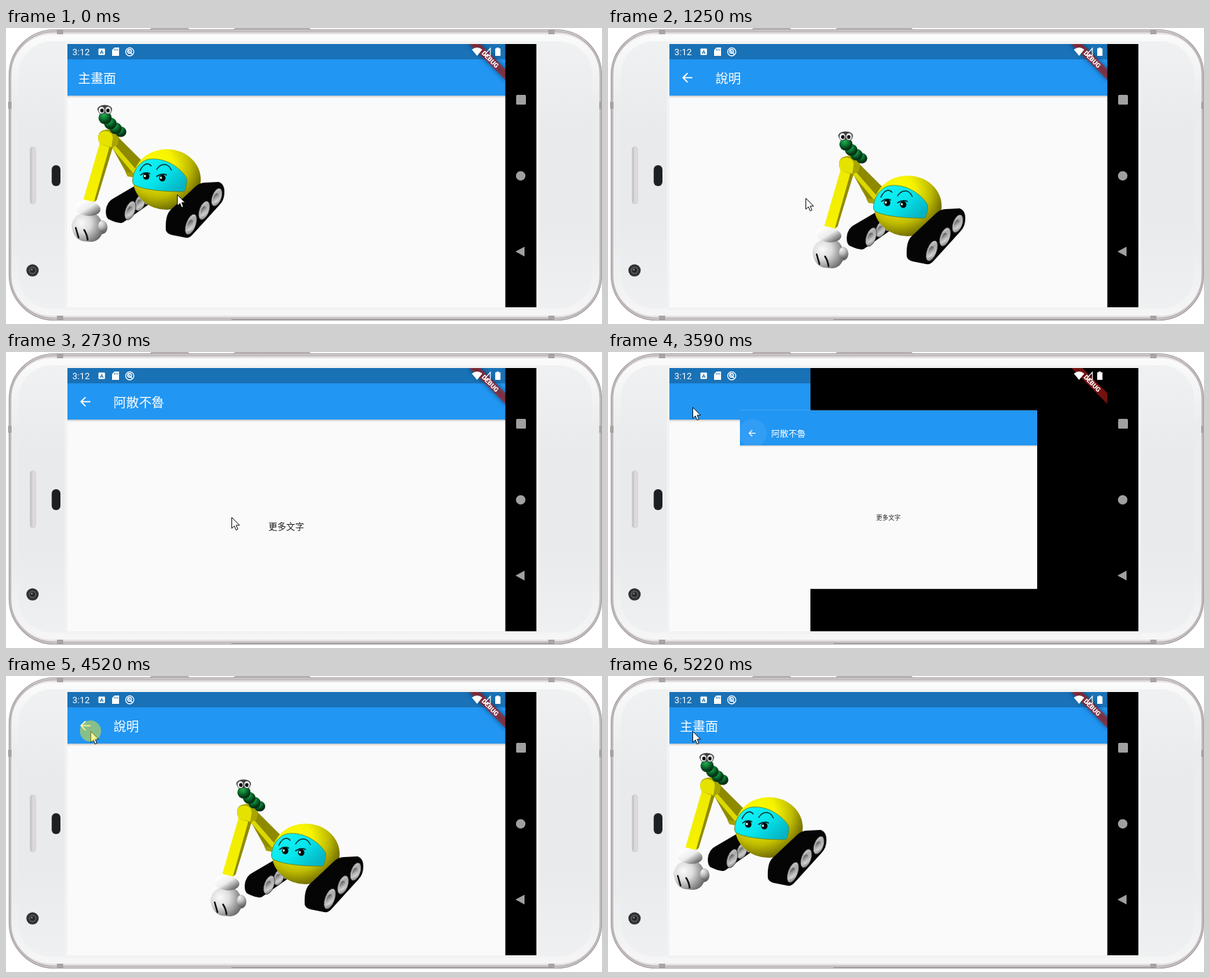
These frames come from a looping animation (854x425 px, 5530 ms). An HTML page with a canvas:

```html
<!DOCTYPE html>
<html lang="zh-Hant">
<head>
<meta charset="utf-8">
<title>Page transitions</title>
<style>
html, body { margin: 0; width: 100%; height: 100%; overflow: hidden; background: #fff; }
canvas { display: block; }
</style>
</head>
<body>
<canvas id="stage" width="854" height="425"></canvas>
<script>
const ctx = document.getElementById('stage').getContext('2d');
const LOOP = 5530, STEP = 77.9;
const APP = { x: 88, y: 23, w: 628, h: 378 };
const MID = { x: APP.x + APP.w / 2, y: APP.y + APP.h / 2 };
const BAR = 74;
const CJK = '"Noto Sans CJK TC", "Noto Sans CJK", sans-serif';
const HOME = [0, 0], CENTRE = [199, 38];

const clamp = v => Math.max(0, Math.min(1, v));
const progress = (k, start, length) => clamp((k - start) / length);

function rect(x, y, w, h, fill) {
  ctx.fillStyle = fill;
  ctx.fillRect(x, y, w, h);
}
function round(x, y, w, h, r, fill, line, width = 1) {
  ctx.beginPath();
  ctx.roundRect(x, y, w, h, r);
  paint(fill, line, width);
}
function oval(x, y, rx, ry, fill, turn = 0, line, width) {
  ctx.beginPath();
  ctx.ellipse(x, y, rx, ry, turn, 0, Math.PI * 2);
  paint(fill, line, width);
}
function paint(fill, line, width = 1) {
  if (fill) { ctx.fillStyle = fill; ctx.fill(); }
  if (line) { ctx.strokeStyle = line; ctx.lineWidth = width; ctx.stroke(); }
}
function shape(d, fill, line, width = 1) {
  const path = new Path2D(d);
  if (fill) { ctx.fillStyle = fill; ctx.fill(path); }
  if (line) { ctx.strokeStyle = line; ctx.lineWidth = width; ctx.stroke(path); }
}
function text(str, x, y, font, fill) {
  ctx.font = font;
  ctx.fillStyle = fill;
  ctx.fillText(str, x, y);
}
function stops(gradient, colors) {
  colors.forEach((c, i) => gradient.addColorStop(i / (colors.length - 1), c));
  return gradient;
}
const linear = (x0, y0, x1, y1, ...colors) => stops(ctx.createLinearGradient(x0, y0, x1, y1), colors);
const glow = (x, y, r, ...colors) => stops(ctx.createRadialGradient(x, y, 0, x, y, r), colors);

// cubic-bezier(.4, 0, .2, 1)
function ease(x) {
  if (x <= 0 || x >= 1) return clamp(x);
  let lo = 0, hi = 1;
  for (let i = 0; i < 24; i++) {
    const u = (lo + hi) / 2, v = 1 - u;
    if (1.2 * v * v * u + 0.6 * v * u * u + u * u * u < x) lo = u; else hi = u;
  }
  return 3 * (1 - lo) * lo * lo + lo * lo * lo;
}
// Circular arc that leaves its start horizontally
function arc(from, to, s) {
  const dx = to[0] - from[0], dy = to[1] - from[1];
  const dist = Math.hypot(dx, dy), r = dist * dist / Math.abs(dy) / 2;
  const a = 2 * Math.asin(dist / (2 * r)) * s;
  return [from[0] + Math.sign(dx) * r * Math.sin(a), from[1] + Math.sign(dy) * r * (1 - Math.cos(a))];
}

function drawPhone() {
  rect(0, 0, 854, 425, '#fff');
  round(207, 0.5, 55, 6, 2, '#d0cacc', '#a09a9b');
  round(327, 0.5, 109, 6, 2, '#d0cacc', '#a09a9b');
  round(4.5, 2.5, 849, 417, 65, '#d3cdcf', '#a19b9c', 1.2);
  round(6.5, 5.5, 845, 411, 62, '#e6e2e3', '#b5afb0', 1.6);
  for (const x of [73, 777]) for (const y of [3, 412]) rect(x, y, 9, 7, '#a8a3a4');
  for (const x of [3, 849]) rect(x, 106, 5, 10, '#a8a3a4');
  rect(323, 418, 460, 1.5, '#a09a9b');
  round(8, 9, 842, 404, 58, linear(0, 9, 0, 413, '#fbfbfb', '#ebecee', '#ebecee', '#ebecee', '#f6f6f7'));
  round(18, 19, 822, 384, 48, linear(0, 19, 0, 403, '#f0f1f2', '#e9eaec', '#e9eaec', '#eff0f1'));
  rect(84, 19, 680, 386, '#f1f2f3');
  round(34.5, 170.5, 8, 82, 4, linear(34, 0, 43, 0, '#bdb9bb', '#dad8d9', '#dedcdd'), '#d0cdce', 0.8);
  round(65.5, 197, 12.5, 30, 6, '#1d2023');
  oval(38, 348, 8.8, 8.8, '#2f3032');
  oval(38, 348, 5.5, 5.5, '#55565a');
  oval(38, 348, 3.6, 3.6, '#242528');
  oval(37, 347, 1.3, 1.3, '#85868b');
}

function drawNav() {
  rect(715.5, 23, 44.5, 378, '#000');
  round(731, 96, 14, 14, 1.5, '#a0a0a0');
  oval(737.5, 212.3, 6.8, 6.8, '#a0a0a0');
  shape('M730 321L743 314V328Z', '#a0a0a0');
}

function drawTrack(outline, wheels) {
  shape(outline, '#050505');
  for (const [x, y, rx, ry] of wheels) {
    oval(x, y, rx, ry, linear(x - rx, y - ry, x + rx, y + ry, '#e8e8e8', '#a8a8a8', '#c4c4c4', '#555'), 0.35, '#222', 0.8);
    oval(x - 1, y + 1, rx * 0.55, ry * 0.52, linear(x - 4, y - 5, x + 4, y + 6, '#444', '#aaa', '#eee'), 0.35);
  }
}

function drawWorm() {
  const segments = [[164.5, 149, 8], [157, 144, 8.8], [149.5, 137, 9], [142, 129, 9.5]];
  for (const [x, y, r] of segments) {
    oval(x, y, r, r * 0.95, glow(x - 2, y - 4, r * 1.6, '#2bab4e', '#0d8136', '#053f1a', '#02210d'));
  }
  oval(141.5, 116.5, 10.5, 6, '#3a3f3d');
  for (const [x, px] of [[137, 137.5], [146.5, 146]]) {
    oval(x, 118, 4.7, 5.6, glow(x - 1, 118, 7, '#fff', '#f0f0f0', '#888'), 0, '#333', 0.7);
    oval(px, 118.5, 2.4, 2.8, '#050505');
  }
}

function drawRobot(x, y) {
  ctx.save();
  ctx.translate(x, y);
  ctx.lineCap = 'round';
  drawTrack('M143 263Q144 249 155 244L184 227Q198 220 207 230L212 248L168 279Q163 282 148 275Q143 273 143 263Z',
    [[204, 243, 6.5, 11], [192, 251, 7, 12], [178, 262, 7, 14]]);
  // rear arm
  shape('M151 170L161 157L197 193L188 214L174 211Z', '#8d8a00');
  shape('M149 169L155 167L188 205L184 211Z', '#dcd800');
  shape('M171 207L185 208L186 215L174 213Z', '#a5a100');
  // ball and visor
  oval(230.5, 217.5, 48.5, 43.5, glow(217, 196, 70, '#ffff00', '#f6f200', '#bfbb00', '#625f00'));
  shape('M181.5 219C182 203 194 188 209 188C232 187 252 203 259 216Q260 227 255 235C233 235 203 234 185 226Q181 224 181.5 219Z',
    linear(194, 190, 239, 240, '#14f2f6', '#06e6ec', '#05b4c4'), '#5d7b1b', 0.8);
  shape('M192 205Q196 196 202 195Q206 195 208 198M216 203Q221 195 228 196Q234 197 237 204', null, '#07373b', 1.5);
  for (const [ex, ey] of [[201, 213], [224, 215.5]]) {
    oval(ex, ey, 4.6, 4.8, '#050505');
    oval(ex - 2, ey - 0.5, 1.5, 1.8, '#dffdfd');
  }
  shape('M193 211Q199 206 206 209M216 213Q223 208 230 211', null, '#052528', 1.6);
  drawTrack('M229 290Q228 270 235 262L270 229Q277 222 285 222L305 221Q313 224 313 235Q313 247 306 254L267 297Q263 302 257 301L237 297Q230 295 229 290Z',
    [[302, 243, 6.8, 13.5], [284, 262, 7, 14], [265, 282, 7, 15.5]]);
  // front arm and joint
  shape('M139 163L154 168L130 247L126 250Z', '#8f8b00');
  shape('M135 163L149 168L126 250L111 246Z', linear(142, 165, 118, 248, '#eeea00', '#f6f200'));
  shape('M132 156Q133 147 143 146L154 144Q162 147 162 158L160 168L151 172L136 167Q132 164 132 156Z', '#a9a500');
  shape('M132 157Q133 148 143 148Q153 149 153 158L151 171L136 167Q132 164 132 157Z', '#e6e200');
  drawWorm();
  // glove
  oval(137.5, 286, 8, 10, glow(135, 281, 15, '#ececec', '#b5b5b5', '#505050'));
  shape('M94 285C95 271 105 265 116 265Q132 264 137 278C143 297 132 308 120 307L110 306Q97 303 94 285Z',
    glow(108, 280, 40, '#fafafa', '#dedede', '#8f8f8f', '#404040'));
  oval(117, 259, 18.5, 10.5, linear(108, 249, 122, 271, '#fff', '#ededed', '#6f6f6f'), 0.12);
  shape('M100 287L104 301M112 290Q116 296 117 304', null, '#111', 2.4);
  oval(138, 285, 6, 8.5, glow(135, 280, 13, '#f4f4f4', '#bdbdbd', '#666'));
  ctx.restore();
}

function drawBar(title, back, ripple) {
  const bottom = APP.y + BAR;
  rect(APP.x, APP.y, APP.w, APP.h, '#fafafa');
  rect(APP.x, bottom, APP.w, 4, linear(0, bottom, 0, bottom + 4, 'rgba(0,0,0,.24)', 'rgba(0,0,0,.07)', 'rgba(0,0,0,0)'));
  rect(APP.x, APP.y, APP.w, BAR, '#2196f3');
  if (back) {
    if (ripple) {
      ctx.save();
      ctx.beginPath();
      ctx.rect(APP.x, APP.y, APP.w, BAR);
      ctx.clip();
      oval(115, 71.5, 30, 30, 'rgba(255,255,255,.07)');
      ctx.restore();
    }
    shape('M121 71.3H108M114 64.8L107.5 71.3L114 77.8', null, '#fff', 1.8);
  }
  text(title, back ? 154 : 103, 79, '18.2px ' + CJK, '#fff');
}

function scaled(s, draw) {
  if (s <= 0) return;
  ctx.save();
  ctx.translate(MID.x, MID.y);
  ctx.scale(s, s);
  ctx.translate(-MID.x, -MID.y);
  draw();
  ctx.restore();
}
function drawMore(ripple) {
  drawBar('阿散不魯', true, ripple);
  text('更多文字', 376, 254.7, '12.8px ' + CJK, '#222');
}

function drawPages(k) {
  ctx.save();
  ctx.beginPath();
  ctx.rect(APP.x, APP.y, APP.w, APP.h);
  ctx.clip();
  rect(APP.x, APP.y, APP.w, APP.h, '#000');
  if (k >= 23 && k < 58) {
    const q = progress(k, 22.99, 6.9) - progress(k, 43.78, 6.9);
    ctx.save();
    ctx.translate(-q * APP.w, 0);
    drawBar('說明', true);
    drawRobot(...CENTRE);
    ctx.restore();
    scaled(q, () => drawMore(k >= 44));
  } else {
    const leaving = k >= 58;
    const p = leaving ? progress(k, 58.85, 6.8) : progress(k, 4.6, 7.9);
    drawBar('主畫面', false);
    scaled(leaving ? 1 - p : p, () => drawBar('說明', true));
    drawRobot(...(leaving ? arc(CENTRE, HOME, ease(p)) : arc(HOME, CENTRE, ease(p))));
  }
  drawBanner();
  ctx.restore();
}

function drawBanner() {
  rect(APP.x, APP.y, APP.w, 22, 'rgba(0,0,0,.25)');
  ctx.save();
  ctx.translate(APP.x + APP.w, APP.y);
  ctx.rotate(Math.PI / 4);
  // The shadow alone: its caster lies outside the clip
  ctx.save();
  ctx.shadowColor = 'rgba(0,0,0,.5)';
  ctx.shadowBlur = 7;
  ctx.shadowOffsetX = -400;
  ctx.shadowOffsetY = 400;
  rect(-37, 25.8 - 400 * Math.SQRT2, 74, 11, '#000');
  ctx.restore();
  rect(-37, 25.8, 74, 11, 'rgba(183,28,28,.63)');
  ctx.textAlign = 'center';
  text('DEBUG', 0, 34.6, '900 9.4px Roboto, sans-serif', '#fff');
  ctx.restore();
}

function drawStatus() {
  text('3:12', 95, 39, '13px Roboto, sans-serif', '#fff');
  round(132.5, 29.5, 9.3, 9.3, 1, '#fff');
  text('A', 134.4, 37, 'bold 8px Roboto, sans-serif', '#1971b6');
  shape('M155.5 28H162V40H152V31.5Z', '#fff');
  shape('M155.5 30V32.5M157.7 30V32.5M160 30V32.5', null, '#1971b6', 0.9);
  oval(177.3, 34.2, 5.8, 5.8, null, 0, '#fff', 1.3);
  oval(177, 33.5, 2.7, 2.7, null, 0, '#fff', 1.4);
  shape('M175 32L181 38', null, '#fff', 1.5);
  shape('M667.5 31Q675 25 682.5 31L675 40Z', '#fff');
  shape('M694 29V39.3H685Z', null, '#fff', 1.2);
  shape('M703 28H706V29.3H708.5V40H701V29.3H703Z', '#fff');
}

const along = (points, i) => points[Math.min(i, points.length - 1)];
function cursorAt(k) {
  if (k < 16) return [245, 239];
  if (k < 30) return along([[283, 244], [330, 250], [358, 252]], k - 16);
  if (k < 35) return [352, 252];
  return along([[323, 237], [270, 200], [215, 155], [170, 118], [135, 90], [121, 79]], k - 35);
}
function drawCursor(k) {
  const [x, y] = cursorAt(k);
  ctx.save();
  ctx.translate(x, y);
  shape('M.5 .5V16.2L4.2 12.8L6.7 18.6L9.2 17.5L6.8 11.8H11.6Z', '#fff', '#111', 1);
  ctx.restore();
  if ([4, 21, 22, 42, 43, 58].includes(k)) oval(x, y, 15.2, 15.2, 'rgba(238,232,35,.5)');
}

const start = performance.now();
function frame() {
  const t = (performance.now() - start) % LOOP;
  const k = Math.floor((t + 13) / STEP) % 71;
  drawPhone();
  drawPages(k);
  drawNav();
  drawStatus();
  drawCursor(k);
  requestAnimationFrame(frame);
}
frame();
</script>
</body>
</html>
```
